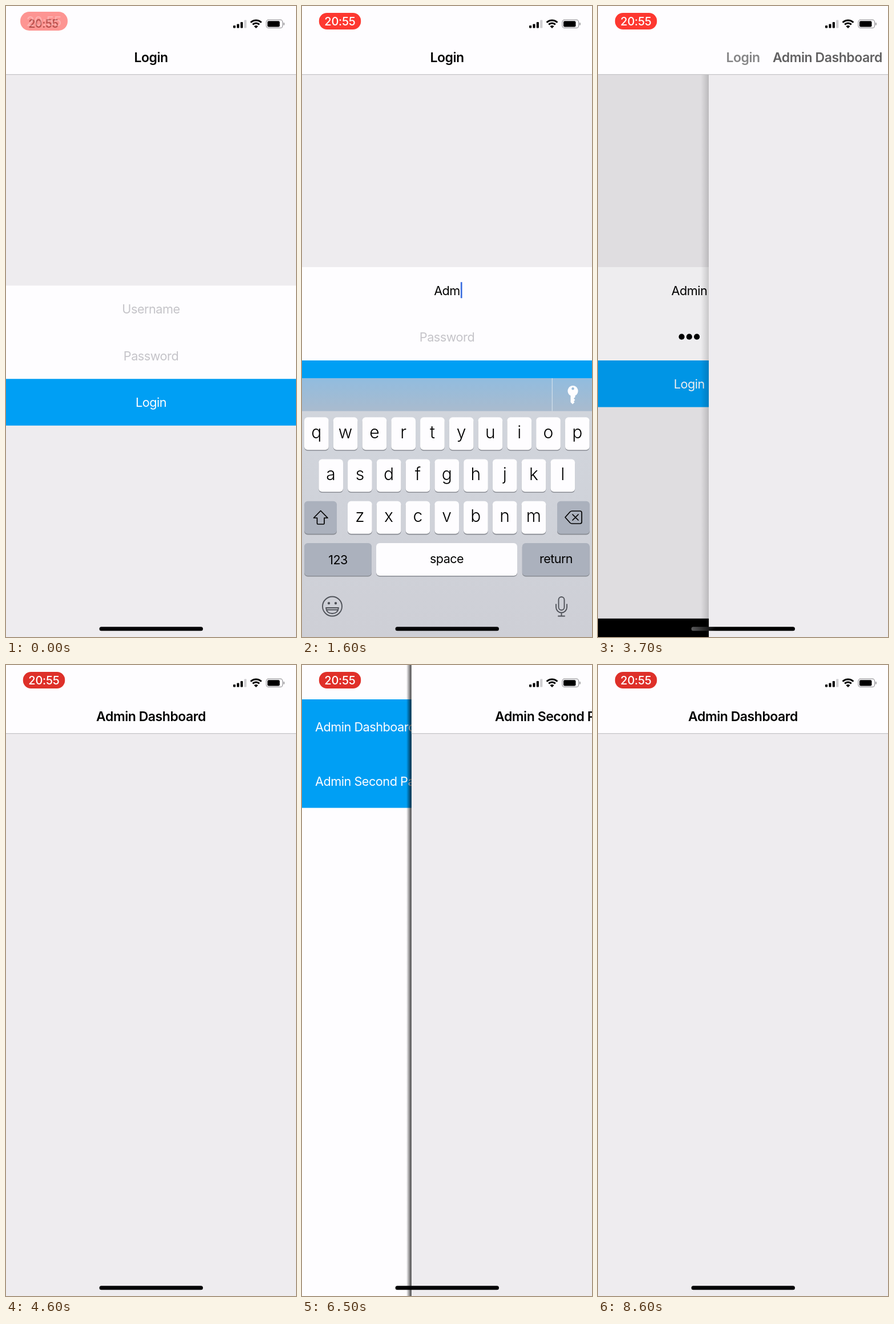
Animation, 508 px wide and 1102 px high, one loop 8700 ms. Source, as an HTML page with a canvas:

```html
<!DOCTYPE html>
<html>
<head>
<meta charset="utf-8">
<style>
html, body { margin: 0; width: 100%; height: 100%; overflow: hidden; background: #fff; }
canvas { display: block; }
</style>
</head>
<body>
<canvas id="stage" width="508" height="1102"></canvas>
<script>
const W = 508, H = 1102, LOOP = 8700;
const WHITE = '#fefdff', PAGE = '#eeecef', BLUE = '#009ff4', GRAY_KEY = '#abb1bd', CARET = '#3b6de0';
const c = document.getElementById('stage').getContext('2d');

const clamp = v => Math.max(0, Math.min(1, v));
const easeInOut = u => (1 - Math.cos(Math.PI * clamp(u))) / 2;
// Remaining distance (1 to 0) of a critically damped spring
const spring = (ms, rate) => { const x = Math.max(0, ms) / 1000 * rate; return (1 + x) * Math.exp(-x); };

function rect(x, y, w, h, fill, r = 0) {
  c.fillStyle = fill;
  c.beginPath();
  c.roundRect(x, y, w, h, r);
  c.fill();
}
function fade(x0, y0, x1, y1, from, to) {
  const g = c.createLinearGradient(x0, y0, x1, y1);
  g.addColorStop(0, from);
  g.addColorStop(1, to);
  return g;
}
function text(s, x, y, size, color, { weight = 400, align = 'center', track = -.5 } = {}) {
  c.font = `${weight} ${size}px Inter, sans-serif`;
  c.letterSpacing = track + 'px';
  c.textAlign = align;
  c.fillStyle = color;
  c.fillText(s, x, y);
  return c.measureText(s).width;
}
function stroke(d, color, width) {
  c.strokeStyle = color;
  c.lineWidth = width;
  c.lineJoin = c.lineCap = 'round';
  c.stroke(new Path2D(d));
}
function dot(x, y, r, color) {
  c.fillStyle = color;
  c.beginPath();
  c.arc(x, y, r, 0, 7);
  c.fill();
}
function moved(x, y, draw) {
  c.save();
  c.translate(x, y);
  draw();
  c.restore();
}

const title = (s, x, alpha = 1) => text(s, x, 98, 23, `rgba(0,0,0,${alpha})`, { weight: 600, track: -.45 });

function navBar() {
  rect(0, 0, W, 120, WHITE);
  rect(0, 119, W, 1.2, '#c6c5c8');
}

function loginForm(t) {
  const name = 'Admin'.slice(0, [1100, 1350, 1600, 1800, 2050].filter(v => t >= v).length);
  const dots = [2900, 3120, 3340].filter(v => t >= v).length;
  const second = t >= 2450, typing = t >= 500 && t < 3600;
  rect(0, 0, W, H, PAGE);
  rect(0, 488.3, W, 163, WHITE);
  rect(0, 651.3, W, 81.5, BLUE);
  text('Login', 254, 700, 21.7, WHITE);
  const w = text(name || 'Username', 254, 537, 21.7, name ? '#000' : '#c5c4c9');
  if (typing && !second) rect(name ? 255 + w / 2 : 200.5, 514.5, 2.7, 28, CARET);
  if (dots) {
    for (let i = 0; i < dots; i++) dot(254 + 13.3 * (i - (dots - 1) / 2), 610, 5.1, '#000');
  } else text('Password', 254, 618.5, 21.7, '#c5c4c9');
  if (typing && second) rect(dots ? 255 + dots * 6.7 : 204.7, 595.5, 2.7, 26, CARET);
}

function key(x, y, w, fill = WHITE) {
  rect(x, y + 1.6, w, 57, '#888b92', 6);
  rect(x, y, w, 57, fill, 6);
}

function keyboard(t) {
  const upper = t < 1100, secure = t >= 2450;
  rect(0, 650, W, 470, fade(0, 707, 0, H, '#d1d5dc', '#cecfd6'));
  rect(0, 650, W, 57.5, fade(0, 650, 0, 707, '#91bcdf', '#a9bbce'));
  rect(437.7, 650, 1.2, 57.5, '#d3e0eb');
  // Password key symbol
  c.fillStyle = WHITE;
  c.fill(new Path2D('M474.5 663a9.3 9.3 0 0 1 4 17.6v2.4l-2.5 2.5 2.5 2.5-2.5 2.5 1.5 1.5-3.5 3.5-3.5-3.5V680.6a9.3 9.3 0 0 1 4-17.6z' +
    'M474.5 666a2.3 2.3 0 1 0 .01 0z'), 'evenodd');

  [['qwertyuiop', 4], ['asdfghjkl', 29.3], ['zxcvbnm', 80]].forEach(([letters, x0], row) => {
    [...letters].forEach((ch, i) => {
      const x = x0 + i * 50.77, y = 718.2 + row * 73.3;
      key(x, y, 42.7);
      text(upper ? ch.toUpperCase() : ch, x + 21.3, y + (upper ? 39.5 : 36.5), upper ? 29 : 30, '#000',
        { weight: upper ? 400 : 300, track: 0 });
    });
  });

  key(4, 864.8, 57, upper ? WHITE : GRAY_KEY);
  const arrow = 'M32.7 881.5L20.5 894H26.5V903.5Q26.5 905 28 905H37.5Q39 905 39 903.5V894H45Z';
  if (upper) { c.fillStyle = '#000'; c.fill(new Path2D(arrow)); }
  stroke(arrow, '#000', upper ? 1 : 1.7);
  key(447, 864.8, 57, GRAY_KEY);
  stroke('M461 893L469.5 883.5Q471 882 473 882H487Q490 882 490 885V901Q490 904 487 904H473Q471 904 469.5 902.5ZM474 888L484 898M484 888L474 898', '#000', 1.7);

  key(4, 938, 118, GRAY_KEY);
  key(130, 938, 247);
  key(385.8, 938, 118, GRAY_KEY);
  text('123', 63, 974.5, 21.5, '#000');
  text('space', 253.5, 973, 21.5, '#000');
  text('return', 445, 973, 21.5, '#000');

  if (!secure) {
    const ink = '#50535a';
    stroke('M70 1048.5A17 17 0 1 1 36 1048.5A17 17 0 1 1 70 1048.5ZM42 1051H64Q63 1061 53 1061Q43 1061 42 1051ZM43 1054.5H63', ink, 1.9);
    dot(47, 1043, 2.2, ink);
    dot(59, 1043, 2.2, ink);
    stroke('M449.5 1037a5 5 0 0 1 10 0V1050a5 5 0 0 1-10 0ZM445 1045V1050a9.5 9.5 0 0 0 19 0V1045M454.5 1060V1065.5M449 1065.5H460', ink, 1.9);
  }
}

function login(t) {
  const lift = -32.3 * (1 - spring(t - 500, 20));
  const rest = t < 3600 ? 1 : spring(t - 3600, 20.7);
  const x = W * rest, p = 1 - rest;
  rect(0, 0, W, H, '#000');
  moved(-.3 * W * p, lift, () => loginForm(t));
  if (p > 0) {
    rect(0, 0, x, H, `rgba(0,0,0,${.1 * p})`);
    rect(x - 14, 0, 14, H, fade(x - 14, 0, x, 0, 'rgba(0,0,0,0)', `rgba(0,0,0,${.16 * Math.min(1, rest * 4)})`));
    rect(x, 0, W, H, PAGE);
  }
  navBar();
  title('Login', 254, clamp(1 - .85 * p - Math.max(0, p - .7)));
  if (p > 0) title('Admin Dashboard', 254 + 387 * rest, clamp(p));
  if (t >= 500 && t < 3640) moved(0, 452 * spring(t - 500, 20), () => keyboard(t));
  return p > 0 ? x : W;
}

function drawerOffset(t) {
  const opened = easeInOut((t - 5080) / 400) - easeInOut((t - 6300) / 440)
    + easeInOut((t - 7080) / 400) - easeInOut((t - 7740) / 360);
  return 338 * opened;
}

function admin(t) {
  const x = drawerOffset(t);
  rect(0, 0, W, H, WHITE);
  rect(0, 60, W, 189.5, BLUE);
  text('Admin Dashboard', 23, 115.5, 21.7, WHITE, { align: 'left' });
  text('Admin Second Page', 23, 210.5, 21.7, WHITE, { align: 'left' });
  if (x > .1) rect(x - 9, 0, 9, H, fade(x - 9, 0, x, 0, 'rgba(0,0,0,0)', 'rgba(0,0,0,.75)'));
  moved(x, 0, () => {
    rect(0, 0, W, H, PAGE);
    navBar();
    title(t >= 6250 && t < 7700 ? 'Admin Second Page' : 'Admin Dashboard', 254);
  });
}

function statusBar(t) {
  [4.5, 7, 10.5, 14].forEach((h, i) => rect(398 + i * 6.4, 38.6 - h, 4.1, h, i < 3 ? '#000' : '#cfced1', 1));

  const weak = t >= 2300 && t < 3200;
  c.lineCap = 'butt';
  [[13.3, weak ? '#cfced1' : '#000'], [8.2, '#000']].forEach(([r, color]) => {
    c.strokeStyle = color;
    c.lineWidth = 3;
    c.beginPath();
    c.arc(438, 38.2, r, -Math.PI * .75, -Math.PI * .25);
    c.stroke();
  });
  c.fillStyle = '#000';
  c.beginPath();
  c.moveTo(438, 39);
  c.arc(438, 39, 5, -Math.PI * .75, -Math.PI * .25);
  c.fill();

  c.strokeStyle = '#9b9a9e';
  c.lineWidth = 1.3;
  c.beginPath();
  c.roundRect(456, 24.2, 28.6, 14.2, 4);
  c.stroke();
  rect(458, 26.2, 21.5, 10.2, '#000', 2.2);
  rect(486, 29, 1.8, 4.6, '#9b9a9e', 1);

  // Recording badge: fades in, then pulses
  const u = clamp(t / 250), glow = (1 + Math.cos(2 * Math.PI * ((t - 900) / 2000 - .38))) / 2;
  if (u < 1) text('20:55', 65.5, 38, 19.5, `rgba(0,0,0,${.6 * (1 - u)})`, { weight: 600 });
  c.save();
  c.globalAlpha = .55 + .45 * u;
  c.translate(66.5, 26.5);
  c.scale(1.13 - .13 * u, 1.13 - .13 * u);
  const red = u < 1 ? '253,66,58' : `${222 + 31 * glow},${48 + 8 * glow},${41 + 7 * glow}`;
  rect(-36.7, -14.5, 73.4, 29, `rgb(${red})`, 14);
  text('20:55', 0, 7.2, 20, `rgba(255,255,255,${.5 + .5 * u})`, { weight: 500, track: -.2 });
  c.restore();
}

function draw(t) {
  c.clearRect(0, 0, W, H);
  let edge = W;
  if (t < 4500) edge = login(t);
  else admin(t);
  statusBar(t);
  const overBlack = t >= 3640 && edge > 164 && edge < W;
  rect(163.5, 1084.3, 181.5, 7, overBlack ? fade(164, 0, edge + 12, 0, '#5a5a5c', '#000') : '#050507', 3.5);
}

function tick() {
  draw(performance.now() % LOOP);
  requestAnimationFrame(tick);
}
tick();
</script>
</body>
</html>
```
